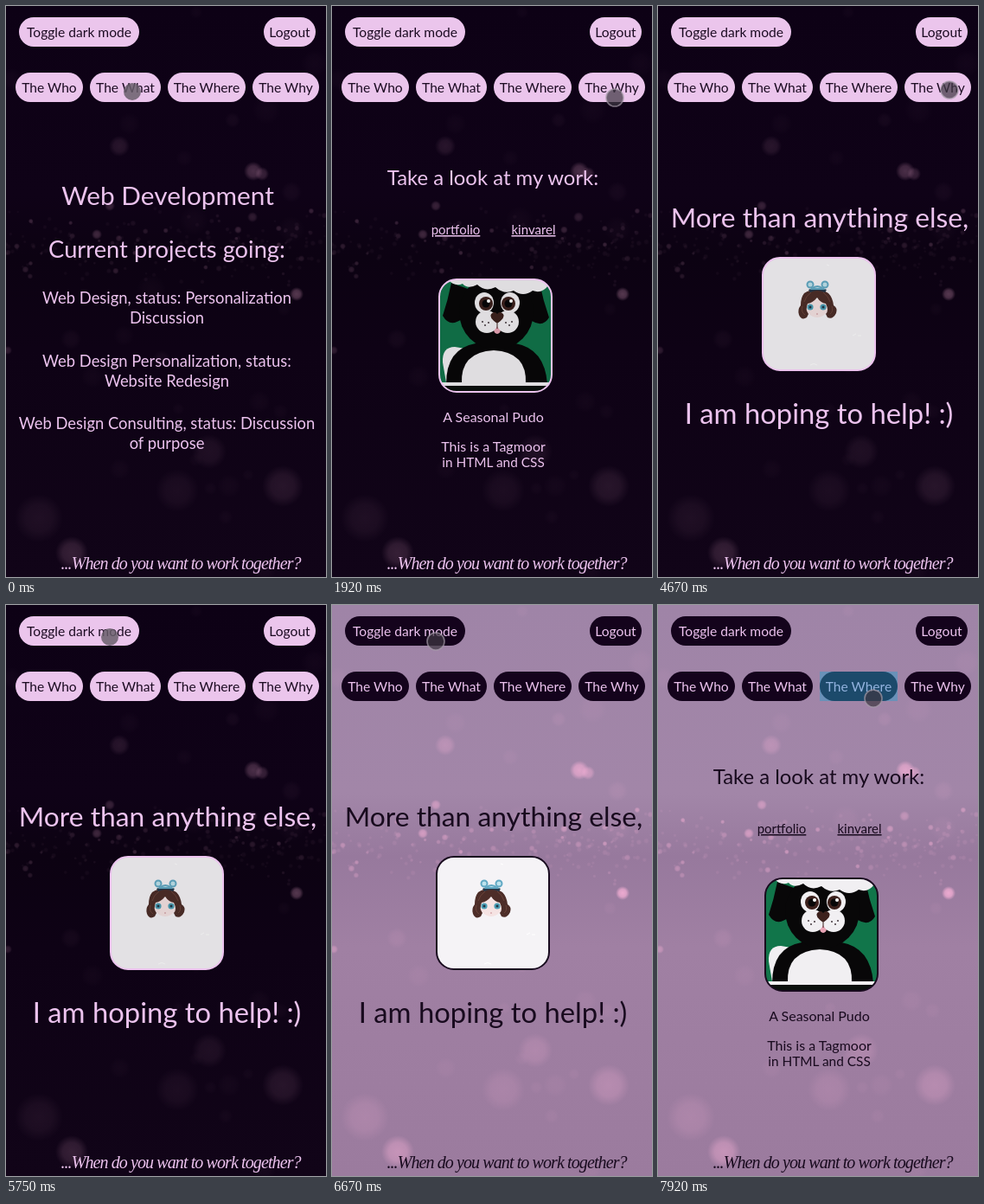
These frames come from a looping animation (370 by 660 pixels, 8 s). An HTML page with a canvas:

```html
<!DOCTYPE html>
<html lang="en">
<head>
<meta charset="utf-8">
<title>The Where</title>
<style>
html, body { margin: 0; width: 100%; height: 100%; overflow: hidden; background: #0d0114; }
canvas, svg { position: absolute; left: 0; top: 0; width: 370px; height: 660px; }
#stage { --ink: #ecc3ee; --pill: #ebc5ec; --label: #1c0b22; --dim: .075; }
#stage.light { --ink: #180a1e; --pill: #14031c; --label: #ecc3ee; --dim: 0; }
text { font-family: Lato, "Open Sans", sans-serif; font-weight: 400; fill: var(--ink); text-anchor: middle; white-space: pre; }
.pill rect { fill: var(--pill); }
.pill text { fill: var(--label); font-size: 15.6px; }
.link { text-decoration: underline; }
.foot { font: italic 400 20px "Liberation Serif", "Noto Serif", serif; letter-spacing: -.9px; }
.frame { fill: none; stroke: var(--ink); stroke-width: 2; }
.shade { fill: #000; opacity: var(--dim); }
#tap { fill: rgba(38,160,205,.45); }
#cursor { fill: rgba(62,56,66,.72); stroke: rgba(165,155,168,.7); stroke-width: 1.6; }
#cursor.down { fill: rgba(104,94,106,.84); stroke: none; }
</style>
</head>
<body>
<canvas id="bg" width="370" height="660"></canvas>
<svg id="stage" viewBox="0 0 370 660">
  <defs>
    <clipPath id="round"><rect width="130" height="130" rx="20"/></clipPath>
  </defs>
  <g id="pills"></g>

  <g class="scene" id="what"></g>

  <g class="scene" id="where">
    <g transform="translate(124 316)">
      <g clip-path="url(#round)">
        <rect width="130" height="130" fill="#11754a"/>
        <path d="M4 96Q3 78 18 78L30 80L24 119H8Z" fill="#f1eff2"/>
        <path d="M8 121Q8 80 42 74H88Q122 80 125 121Z" fill="#080708"/>
        <path d="M26 121Q24 84 63 82Q102 84 100 121Z" fill="#f1eff2"/>
        <path d="M14 4Q10 24 4 42Q12 56 26 46Q34 38 36 12ZM116 4Q120 24 127 44Q120 56 107 48Q98 40 96 12Z" fill="#080708"/>
        <ellipse cx="66" cy="38" rx="43" ry="43" fill="#080708"/>
        <path d="M10 0H126V7Q119 17 108 13Q97 21 86 13Q75 18 65 9Q53 15 44 6Q33 12 27 5Q18 9 10 0Z" fill="#f1eff2"/>
        <g fill="#f1eff2"><ellipse cx="52" cy="27" rx="11" ry="12"/><ellipse cx="82" cy="27" rx="11" ry="12"/></g>
        <g fill="#3d211d"><circle cx="54" cy="28" r="8"/><circle cx="80" cy="28" r="8"/></g>
        <g fill="#080708"><circle cx="54" cy="28" r="4.5"/><circle cx="80" cy="28" r="4.5"/></g>
        <g fill="#fff"><circle cx="57" cy="25" r="2"/><circle cx="83" cy="25" r="2"/></g>
        <ellipse cx="67" cy="58" rx="4" ry="5" fill="#e9a4b5"/>
        <g fill="#f1eff2"><circle cx="55" cy="49" r="13"/><circle cx="79" cy="49" r="13"/></g>
        <path d="M67 51Q57 44 60 40Q64 36 67 40Q70 36 74 40Q77 44 67 51Z" fill="#3d211d"/>
        <path d="M67 51V57" stroke="#3d211d"/>
        <g fill="#30252b" id="freckles"></g>
        <path d="M0 119H130V130H0Z" fill="#0b100d"/>
        <path d="M0 119H130V123H0Z" fill="#f1eff2"/>
        <rect class="shade" width="130" height="130"/>
      </g>
      <rect class="frame" width="130" height="130" rx="20"/>
    </g>
  </g>

  <g class="scene" id="why">
    <g transform="translate(121 291)">
      <g clip-path="url(#round)">
        <rect width="130" height="130" fill="#f5f3f6"/>
        <path d="M104 90l4-2M110 90h4M55 124q4-3 8 0M74 8l3 1" stroke="#fff" fill="none"/>
        <path d="M51 48H75V62Q70 69 63 69Q56 69 51 62Z" fill="#f5e3e3"/>
        <g fill="#4d9fb6"><ellipse cx="55" cy="57" rx="3.6" ry="3.6"/><ellipse cx="70" cy="57" rx="3.6" ry="3.6"/></g>
        <g fill="#1f3444"><circle cx="55" cy="57" r="1.5"/><circle cx="70" cy="57" r="1.5"/></g>
        <path d="M62 65h2" stroke="#c98f95"/>
        <path d="M48 41Q62 32 76 41Q81 46 82 55Q87 58 85 64Q81 72 75 69L73 65Q77 61 73 53Q67 52 63 46Q58 52 52 53Q49 60 53 65L51 69Q45 73 42 66Q40 60 44 55Q44 46 48 41Z" fill="#4d2d28"/>
        <path d="M46 56q-2 7 3 10M80 56q2 6-2 9M56 40q-6 4-8 11M70 40q6 4 8 11" stroke="#6b443a" fill="none"/>
        <path d="M53 37Q63 30 74 37L72 40Q63 36 55 40Z" fill="#24384a"/>
        <g fill="#bfe3ed" stroke="#61a9c4" stroke-width="2"><circle cx="55" cy="31" r="3.5"/><circle cx="72" cy="31" r="3.5"/><path d="M57 36Q63 30 70 36Z"/></g>
        <rect class="shade" width="130" height="130"/>
      </g>
      <rect class="frame" width="130" height="130" rx="20"/>
    </g>
  </g>

  <text class="foot" x="202" y="651">...When do you want to work together?</text>
  <rect id="tap"/>
  <circle id="cursor" r="10"/>
</svg>
<script>
const LOOP = 8000, STEP = 1000 / 12;
const $ = id => document.getElementById(id);
const stage = $('stage');

function add(parent, tag, attrs, text) {
  const el = document.createElementNS('http://www.w3.org/2000/svg', tag);
  for (const k in attrs) el.setAttribute(k, attrs[k]);
  if (text) el.textContent = text;
  return parent.appendChild(el);
}

// name: [label, x, y, width]
const pills = {
  toggle: ['Toggle dark mode', 15, 13, 139],
  logout: ['Logout', 298, 13, 60],
  who: ['The Who', 11, 77, 78],
  what: ['The What', 97, 77, 82],
  where: ['The Where', 187, 77, 90],
  why: ['The Why', 285, 77, 77]
};
for (const [label, x, y, w] of Object.values(pills)) {
  const g = add($('pills'), 'g', { class: 'pill' });
  add(g, 'rect', { x, y, width: w, height: 34, rx: 17 });
  add(g, 'text', { x: x + w / 2, y: y + 23 }, label);
}

// scene: [text, center x, baseline, size]
const lines = {
  what: [
    ['Web Development', 187, 230, 29.8],
    ['Current projects going:', 186, 291, 27.3],
    ['Web Design, status: Personalization', 186, 344, 18.4],
    ['Discussion', 186, 367, 18.4],
    ['Web Design Personalization, status:', 186, 417, 18.4],
    ['Website Redesign', 186, 440, 18.4],
    ['Web Design Consulting, status: Discussion', 186, 489, 18.4],
    ['of purpose', 186, 512, 18.4]
  ],
  where: [
    ['Take a look at my work:', 186, 207, 23.9],
    ['portfolio', 143, 264, 15, 'link'],
    ['kinvarel', 233, 264, 15, 'link'],
    ['A Seasonal Pudo', 186.5, 481, 16],
    ['This is a Tagmoor', 186.5, 515, 16],
    ['in HTML and CSS', 186.5, 533, 15.4]
  ],
  why: [
    ['More than anything else,', 187, 256, 31.8],
    ['I am hoping to help! :)', 186, 483, 32.8]
  ]
};
for (const id in lines)
  for (const [text, x, y, size, cls = ''] of lines[id])
    add($(id), 'text', { x, y, 'font-size': size, class: cls }, text);

for (const side of [-1, 1])
  for (const [dx, dy] of [[10, 50], [14, 53], [17, 49]])
    add($('freckles'), 'circle', { cx: 67 + side * dx, cy: dy, r: 0.9 });

// Blurred lights: x, y, radius, strength
const lights = [
  [286, 191, 11, .7], [296, 194, 8, .5], [131, 162, 12, .3], [105, 264, 6, .6], [120, 231, 6, .5],
  [336, 333, 8, .85], [160, 92, 9, .2], [235, 515, 20, .2], [198, 560, 25, .15],
  [320, 555, 24, .28], [38, 592, 28, .18], [76, 632, 19, .45], [75, 385, 12, .1],
  [285, 244, 6, .4], [330, 215, 12, .1], [2, 398, 5, .4], [180, 408, 10, .12], [262, 132, 9, .1]
];

function spot(c, x, y, r, a) {
  const g = c.createRadialGradient(x, y, 0, x, y, r);
  g.addColorStop(0, `rgba(250,178,216,${a})`);
  g.addColorStop(.55, `rgba(250,178,216,${a * .8})`);
  g.addColorStop(1, 'rgba(250,178,216,0)');
  c.fillStyle = g;
  c.fillRect(x - r, y - r, 2 * r, 2 * r);
}

function paint(light) {
  const c = $('bg').getContext('2d');
  const g = c.createLinearGradient(0, 0, 0, 660);
  const tones = light ? ['#9f84a7', '#a286a8', '#97799d', '#a080a3', '#9b7b9e']
                      : ['#0d0115', '#0f0217', '#0c0212', '#0e0215', '#110418'];
  tones.forEach((t, i) => g.addColorStop([0, .33, .44, .6, 1][i], t));
  c.fillStyle = g;
  c.fillRect(0, 0, 370, 660);
  const k = light ? 1 : .36;
  for (const [x, y, r, a] of lights) spot(c, x, y, r, a * k);
  let seed = 7;
  const rnd = () => (seed = seed * 16807 % 2147483647) / 2147483647;
  for (let i = 0; i < 200; i++) {
    const x = rnd() * 370, y = 278 + (rnd() + rnd() + rnd() - 1.5) * 34;
    const bright = rnd() ** 8;
    spot(c, x, y, 1.5 + rnd() * 2 + bright, (.1 + bright * .45) * k);
  }
  for (let i = 0; i < 24; i++)
    spot(c, rnd() * 370, rnd() * 660, 6 + rnd() * 12, .06 * k);
}

// time, x, y
const path = [
  [0, 146, 99], [250, 146, 99], [920, 236, 94], [1250, 236, 94], [1920, 327, 106],
  [2420, 337, 97], [4950, 337, 97], [5750, 120, 37], [6450, 120, 37],
  [6670, 120, 42], [7250, 236, 100], [7670, 249, 108], [LOOP, 249, 108]
];
const scenes = [[0, 'what'], [995, 'where'], [3325, 'why'], [7745, 'where']];
const taps = [[995, 'where'], [3325, 'why'], [5825, 'toggle'], [7745, 'where']];
const presses = [85, ...taps.map(p => p[0])];
const latest = (list, t) => list.filter(e => e[0] <= t).pop();

function cursorAt(t) {
  const i = path.findIndex(p => p[0] > t);
  const [t0, x0, y0] = path[i - 1], [t1, x1, y1] = path[i];
  const u = (t - t0) / (t1 - t0), e = u * u * (3 - 2 * u);
  return [x0 + (x1 - x0) * e, y0 + (y1 - y0) * e];
}

let theme = null;
function draw(now) {
  const t = Math.floor((now % LOOP + 5) / STEP) * STEP % LOOP;
  const light = t >= 5825;
  if (light !== theme) {
    theme = light;
    stage.classList.toggle('light', light);
    paint(light);
  }
  const scene = latest(scenes, t)[1];
  for (const el of document.querySelectorAll('.scene'))
    el.style.display = el.id === scene ? '' : 'none';

  const tap = latest(taps, t), box = $('tap');
  const age = tap ? t - tap[0] : LOOP;
  box.style.opacity = Math.max(0, Math.min(1, (340 - age) / 160));
  if (tap) {
    const [, x, y, w] = pills[tap[1]];
    Object.entries({ x, y, width: w, height: 34 }).forEach(([k, v]) => box.setAttribute(k, v));
  }
  const [cx, cy] = cursorAt(t);
  $('cursor').setAttribute('transform', `translate(${cx.toFixed(2)} ${cy.toFixed(2)})`);
  $('cursor').classList.toggle('down', presses.some(p => p > t && p - t < 170));
}

const start = performance.now();
function tick() {
  draw(performance.now() - start);
  requestAnimationFrame(tick);
}
tick();
</script>
</body>
</html>
```
